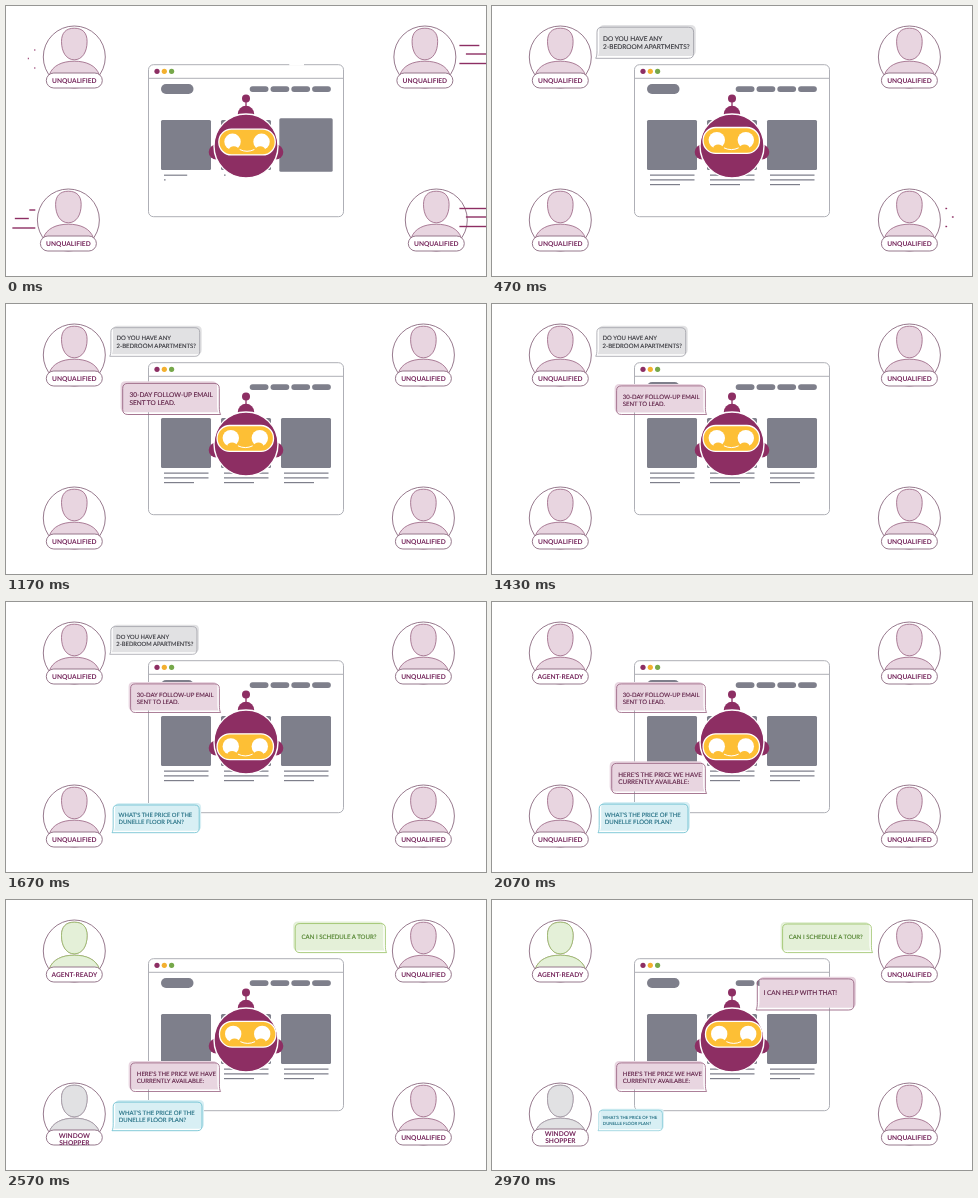
These frames come from a looping animation (480 by 270 pixels, 3010 ms). An HTML page:

```html
<!DOCTYPE html>
<html lang="en">
<head>
<meta charset="utf-8">
<title>Lead qualifying chatbot</title>
<style>
  html, body { margin: 0; width: 100%; height: 100%; overflow: hidden; background: #fff; }
  svg { display: block; width: 100vw; height: 100vh; font: 6px Lato, sans-serif; }
  text { text-rendering: geometricPrecision; }
</style>
</head>
<body>
<svg id="stage" viewBox="0 0 480 270"></svg>
<script>
const LOOP = 3010;
const PLUM = '#8d2e63', GREY = '#7e7f8b', FRAME = '#aeafb6', RING = '#8c6a80';
const PINK = { fill: '#e8d5e0', line: '#97607f', text: '#5f2046' };
const SILVER = { fill: '#e1e1e3', line: '#a0a0a8', text: '#36363c' };
const CYAN = { fill: '#d8eff4', line: '#63bccd', text: '#1f6c80' };
const GREEN = { fill: '#e4f0d8', line: '#97c062', text: '#4c7f28' };

const stage = document.getElementById('stage');
const clamp = v => Math.max(0, Math.min(1, v));
const part = (t, start, length) => clamp((t - start) / length);
const easeOut = p => 1 - (1 - p) ** 2;
const smooth = p => p * p * (3 - 2 * p);
const mix = (a, b, p) => a + (b - a) * p;

const rect = (x, y, w, h, r, attrs) =>
  `<rect x="${x}" y="${y}" width="${w}" height="${h}" rx="${r}" ${attrs}/>`;
const circle = (x, y, r, attrs) => `<circle cx="${x}" cy="${y}" r="${r}" ${attrs}/>`;
const line = (x1, y1, x2, y2, color, width) =>
  `<path d="M${x1} ${y1}L${x2} ${y2}" stroke="${color}" stroke-width="${width}"/>`;
const group = (x, y, body, extra = '') =>
  `<g transform="translate(${x} ${y}) ${extra}">${body}</g>`;

// Trails are the three speed-line lengths at the start of the loop.
const people = [
  { x: 68.3, y: 51, shift: 0, settle: 1, trail: [1, 1, 1], trailY: 4.5, fade: 60,
    swap: 1780, label: ['AGENT-READY'], tint: GREEN, tintAt: 2090 },
  { x: 417.4, y: 51, shift: 1.5, settle: 100, trail: [20, 24, 30], trailY: 0, fade: 380 },
  { x: 68.3, y: 214, shift: -6, settle: 150, trail: [6, 14, 23], trailY: 1.5, fade: 350,
    swap: 2440, label: ['WINDOW', 'SHOPPER'], tint: SILVER, tintAt: 2370 },
  { x: 417.4, y: 214, shift: 13, settle: 250, trail: [30, 30, 30], trailY: 0, fade: 500 }
];

// Position is the tail tip; side is 1 when the bubble extends to the right of it.
const bubbles = [
  { x: 103.7, y: 52.3, side: 1, color: SILVER, open: 385, close: 1650,
    text: ['DO YOU HAVE ANY', '2-BEDROOM APARTMENTS?'] },
  { x: 214.6, y: 110.5, side: -1, color: PINK, open: 1085, close: 2200,
    text: ['30-DAY FOLLOW-UP EMAIL', 'SENT TO LEAD.'] },
  { x: 106, y: 230.7, side: 1, color: CYAN, open: 1611, close: 2907,
    text: ["WHAT'S THE PRICE OF THE", 'DUNELLE FLOOR PLAN?'] },
  { x: 214.6, y: 191.5, side: -1, color: PINK, open: 1942, close: LOOP,
    text: ["HERE'S THE PRICE WE HAVE", 'CURRENTLY AVAILABLE:'] },
  { x: 380.6, y: 52.6, side: -1, color: GREEN, open: 2415, close: LOOP,
    text: ['CAN I SCHEDULE A TOUR?'] },
  { x: 264, y: 110, side: 1, color: PINK, open: 2885, close: LOOP,
    text: ['I CAN HELP WITH THAT!'] }
];

function browser(t) {
  const fill = `fill="${GREY}"`;
  let s = rect(142.5, 58.7, 195, 152, 5, `fill="#fff" stroke="${FRAME}"`)
    + line(142.5, 72.3, 337.5, 72.3, FRAME, 1)
    + [PLUM, '#f3b02f', '#76a84a'].map((c, i) => circle(151 + i * 7.3, 65.3, 2.6, `fill="${c}"`)).join('')
    + rect(155, 78, 32.5, 10, 5, fill);
  const gap = 15 * (1 - part(t, 0, 60));
  if (gap) s += line(298 - gap, 58.7, 298, 58.7, '#fff', 2);
  for (let i = 0; i < 4; i++) s += rect(243.7 + i * 20.8, 80.2, 18.8, 5.8, 2.9, fill);
  for (let card = 0; card < 3; card++) {
    const x = 155 + card * 60;
    const grow = card === 2 ? 1.7 * (1 - easeOut(part(t, 0, 110))) : 0;
    s += rect(x - grow, 114 - grow, 50 + 2 * grow, 50 + 2 * grow, 1.5, fill);
    for (let row = 0; row < 3; row++) {
      const p = part(t, -72 + 68 * (card + row), 140);
      const y = 169.2 + row * 4.7;
      if (p) s += line(x + 3, y, x + 3 + (row === 2 ? 30 : 44.5) * p, y, GREY, 1.2);
    }
  }
  return s;
}

function robot(t) {
  const first = smooth(part(t, -80, 200));
  const down = smooth(part(t, 1490, 130));
  const right = smooth(part(t, 2290, 130));
  const x = mix(mix(242, 239.3, first), 241.7, right);
  const y = mix(mix(mix(137, 134.4, first), 144.7, down), 134.2, right);
  const fill = `fill="${PLUM}"`;
  const eye = side => circle(side * 14.5, -.3, 8.2, 'fill="#fff"')
    + `<ellipse cx="${side * 13.2}" cy="7.6" rx="4.8" ry="3.4" fill="#fdbf35"/>`;
  const visor = rect(-28.2, -12.9, 56.4, 25.8, 12.6, 'fill="#fdbf35" stroke="#fff" stroke-width="1.3"')
    + eye(-1) + eye(1)
    + '<path d="M-7 7.6Q0 11 7 7.6" fill="none" stroke="#fff" stroke-linecap="round"/>';
  return line(240, 92, 240, 102, PLUM, 1.3)
    + circle(240, 92.5, 4, fill)
    + circle(240, 108, 8.2, fill)
    + circle(210.3, 146, 7.6, fill) + circle(269.7, 146, 7.6, fill)
    + circle(240, 140, 32, `${fill} stroke="#fff" stroke-width="1.4"`)
    + '<clipPath id="head"><circle cx="240" cy="140" r="31.6"/></clipPath>'
    + `<g clip-path="url(#head)">${group(x, y, visor)}</g>`;
}

const figure = (color, opacity) =>
  `<g fill="${color.fill}" stroke="${color.line}" stroke-width=".8" opacity="${opacity}">
    <path d="M-25 18C-22 8.5 -12 4.2 0 4.2S22 8.5 25 18Z"/>
    <path d="M0 -28.8C8.5 -28.8 12.8 -24 12.8 -15.5C12.8 -5 8 2.8 0 2.8S-12.8 -5 -12.8 -15.5C-12.8 -24 -8.5 -28.8 0 -28.8Z"/>
  </g>`;

function label(lines, y) {
  const top = y - (lines.length - 1) * 4.2 + 2.4;
  return lines.map((s, i) => `<text y="${top + i * 7.2}">${s}</text>`).join('');
}

function person(p, t, i) {
  const side = p.x < 240 ? -1 : 1;
  const near = side < 0 ? 39 : 36;
  const left = 1 - part(t, 0, p.fade);
  const trail = left ? p.trail.map((len, n) => {
    const x = p.x + side * (near + (n === 1 ? 6.5 : 0));
    const y = p.y + p.trailY + [-11.5, -3, 6.5][n];
    return line(x, y, x + side * Math.max(len * left, .8), y, PLUM, 1.4);
  }).join('') : '';

  const swap = p.label ? easeOut(part(t, p.swap, 200)) : 0;
  const tall = p.label && p.label.length > 1 ? part(t, 2570, 130) : 0;
  const h = 15 + 2 * tall;
  const box = rect(-28, 23.5 - h / 2, 56, h, 7.5, '');
  const ring = `fill="#fff" stroke="${RING}" stroke-width=".9"`;
  const tint = p.tint ? part(t, p.tintAt, 110) : 0;
  const body = circle(0, 0, 31, ring)
    + figure(PINK, 1) + (tint ? figure(p.tint, tint) : '')
    + `<g ${ring}>${box}</g>`
    + `<clipPath id="pill${i}">${box}</clipPath>`
    + `<g clip-path="url(#pill${i})" text-anchor="middle" font-weight="700" font-size="6.6" fill="#74245a">`
    + (swap < 1 ? label(['UNQUALIFIED'], 23.5 - 16 * swap) : '')
    + (swap ? label(p.label, 23.5 + 16 * (1 - swap)) : '') + '</g>';
  return group(p.x + p.shift * (1 - easeOut(part(t, 0, p.settle))), p.y, body) + trail;
}

function bubble(b, t) {
  if (t <= b.open) return '';
  const pop = 1.09 * easeOut(part(t, b.open, 90)) - .09 * smooth(part(t, b.open + 90, 90));
  const scale = pop * (1 - part(t, b.close, 120) ** 2);
  if (scale <= 0) return '';
  const shape = 'M0 0C1 -1.5 1.2 -4 1.2 -7V-24Q1.2 -28.6 6 -28.6H85.2Q90 -28.6 90 -24V-4.6Q90 0 85.2 0Z';
  const flip = `scale(${b.side} 1)`;
  const textX = b.side > 0 ? 6.8 : -83.8;
  const firstY = b.text.length > 1 ? -16 : -13.8;
  const { fill, line: edge, text: ink } = b.color;
  // The fill sits slightly off its outline, away from the tail.
  const body = `<path d="${shape}" transform="${flip} translate(2 -2)" fill="${fill}"/>`
    + `<path d="${shape}" transform="${flip}" fill="none" stroke="${edge}" stroke-width=".8"/>`
    + `<g fill="${ink}" stroke="${ink}" stroke-width=".12">`
    + b.text.map((s, i) => `<text x="${textX}" y="${firstY + i * 7.4}">${s}</text>`).join('') + '</g>';
  return group(b.x, b.y, body, `scale(${scale})`);
}

function draw(t) {
  stage.innerHTML = browser(t) + robot(t)
    + people.map((p, i) => person(p, t, i)).join('')
    + bubbles.map(b => bubble(b, t)).join('');
}

const began = performance.now();
function tick() {
  draw((performance.now() - began) % LOOP);
  requestAnimationFrame(tick);
}
tick();
</script>
</body>
</html>
```
